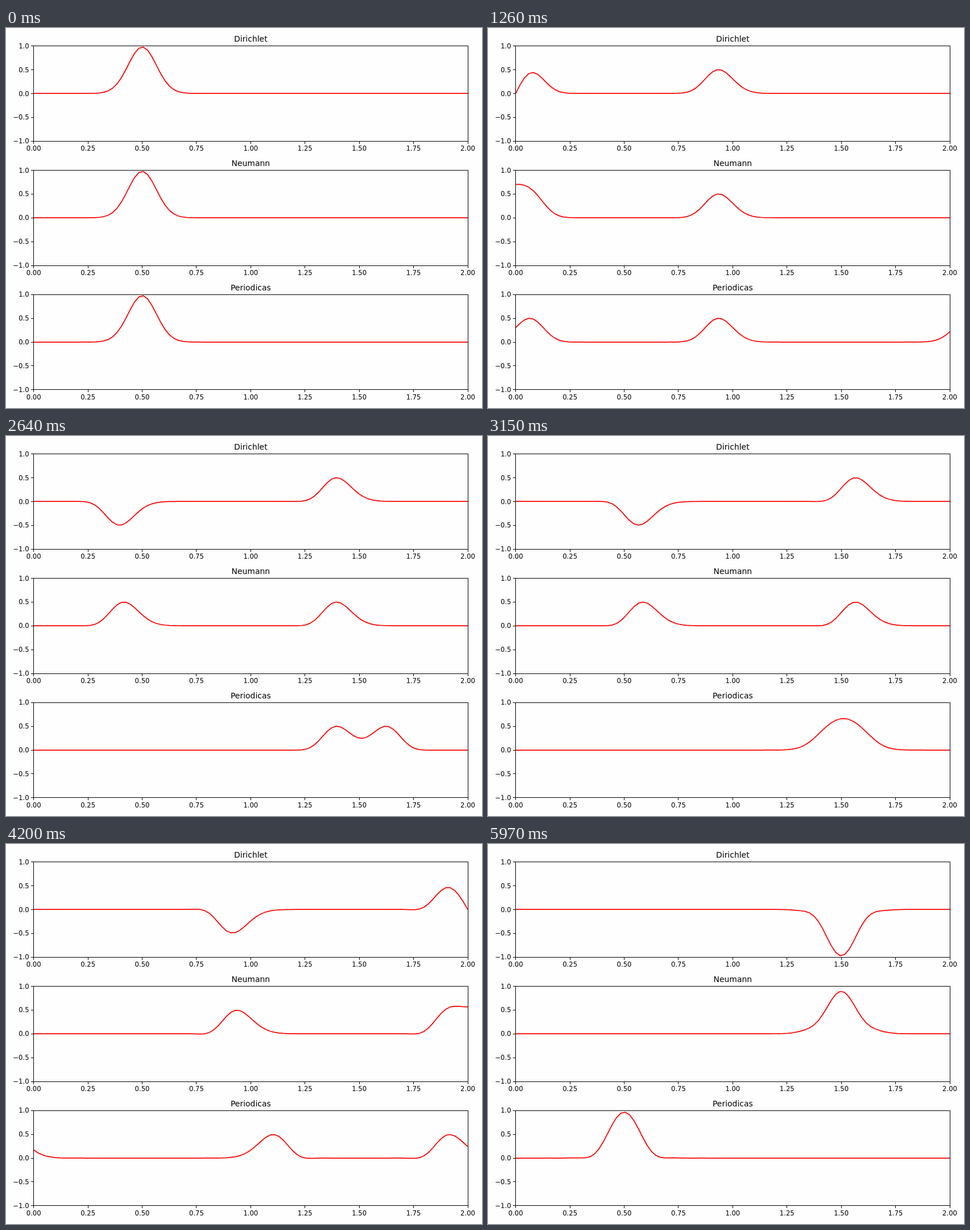
An HTML page for the animation above (6 s loop, 837 by 669 pixels).

```html
<!DOCTYPE html>
<html lang="es">
<head>
<meta charset="utf-8">
<title>Wave equation</title>
<style>
  html, body { margin: 0; width: 100%; height: 100%; overflow: hidden; background: #fefefe; }
  svg { display: block; width: 837px; height: 669px; }
  text { font: 11.62px "DejaVu Sans", sans-serif; fill: #000; }
  .title { font-size: 13.95px; }
  .axis { fill: none; stroke: #000; stroke-width: 1; }
  .wave { fill: none; stroke: #f00; stroke-width: 1.75; stroke-linejoin: round; }
</style>
</head>
<body>
<svg id="stage" viewBox="0 0 837 669"></svg>
<script>
const STEP_MS = 30, STEPS = 200;
const POINTS = 100, COURANT_SQ = 0.25, SHARPNESS = 123.5;
const LEFT = 48.7, WIDTH = 763.3, HEIGHT = 167.8;
const stage = document.getElementById("stage");

// Each rule fixes the end points after a step; the periodic one wraps instead.
const panels = [
  { title: "Dirichlet", top: 31.3, edges: u => { u[0] = u[POINTS - 1] = 0; } },
  { title: "Neumann", top: 250.2, edges: u => { u[0] = u[1]; u[POINTS - 1] = u[POINTS - 2]; } },
  { title: "Periodicas", top: 469.1, edges: () => {} }
];

function add(parent, tag, attrs, text) {
  const node = document.createElementNS("http://www.w3.org/2000/svg", tag);
  for (const key in attrs) node.setAttribute(key, attrs[key]);
  if (text) node.textContent = text;
  return parent.appendChild(node);
}

const snap = v => Math.floor(v) + 0.5;

// Leapfrog scheme for the wave equation, released from rest.
function simulate(edges) {
  let now = Array.from({ length: POINTS }, (_, i) =>
    Math.exp(-SHARPNESS * (2 * i / (POINTS - 1) - 0.5) ** 2));
  let before = now;
  return Array.from({ length: STEPS }, () => {
    const next = now.map((v, i) => {
      const a = now[(i + POINTS - 1) % POINTS], b = now[(i + 1) % POINTS];
      return 2 * v - before[i] + COURANT_SQ * (a - 2 * v + b);
    });
    edges(next);
    before = now;
    now = next;
    return next;
  });
}

function wavePath(values, top) {
  return "M" + values.map((v, i) =>
    (LEFT + WIDTH * i / (POINTS - 1)).toFixed(2) + "," +
    (top + HEIGHT * (1 - v) / 2).toFixed(2)).join("L");
}

function buildPanel({ title, top, edges }, index) {
  const x0 = snap(LEFT), x1 = snap(LEFT + WIDTH);
  const y0 = snap(top), y1 = snap(top + HEIGHT);
  const clip = add(stage, "clipPath", { id: "clip" + index });
  add(clip, "rect", { x: x0, y: y0, width: x1 - x0, height: y1 - y0 });
  const wave = add(stage, "path", { class: "wave", "clip-path": `url(#clip${index})` });

  add(stage, "rect", { class: "axis", x: x0, y: y0, width: x1 - x0, height: y1 - y0 });
  add(stage, "text", { class: "title", x: LEFT + WIDTH / 2, y: top - 7, "text-anchor": "middle" }, title);

  for (let i = 0; i <= 8; i++) {
    const x = LEFT + WIDTH * i / 8;
    add(stage, "path", { class: "axis", d: `M${snap(x)},${y1}v4.5` });
    add(stage, "text", { x, y: top + HEIGHT + 17.1, "text-anchor": "middle" }, (i / 4).toFixed(2));
  }
  for (let i = 0; i <= 4; i++) {
    const y = top + HEIGHT * i / 4, value = 1 - i / 2;
    add(stage, "path", { class: "axis", d: `M${x0},${snap(y)}h-4.5` });
    add(stage, "text", { x: LEFT - 8.1, y: y + 4.3, "text-anchor": "end" },
      value.toFixed(1).replace("-", "\u2212"));
  }
  const paths = simulate(edges).map(values => wavePath(values, top));
  return step => wave.setAttribute("d", paths[step]);
}

const updates = panels.map(buildPanel);
let start = null;

function draw(time) {
  const step = Math.floor(time / STEP_MS) % STEPS;
  updates.forEach(update => update(step));
}

function tick(now) {
  if (start === null) start = now;
  draw(now - start);
  requestAnimationFrame(tick);
}

draw(0);
requestAnimationFrame(tick);
</script>
</body>
</html>
```
